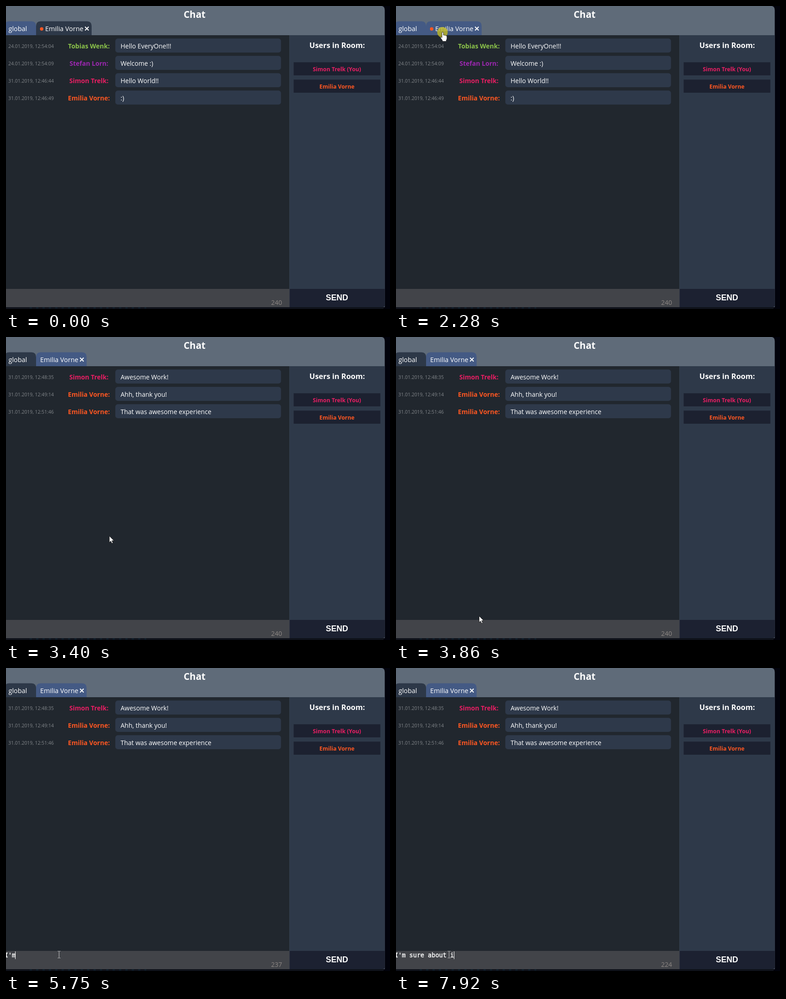
These frames come from a looping animation (843 px wide and 664 px high, 8000 ms). An HTML page:

```html
<!DOCTYPE html>
<html lang="en">
<head>
<meta charset="utf-8">
<title>Chat</title>
<style>
  html, body { margin: 0; width: 100%; height: 100%; overflow: hidden; background: #02030c; }
  svg { display: block; }
  text { font: 14px "Open Sans", "Noto Sans", sans-serif; fill: #fff; white-space: pre; }
  .mid { text-anchor: middle; }
  .bold { font-weight: 700; }
  .title { font-size: 20.6px; }
  .heading { font-size: 16.4px; }
  .user { font-size: 12.25px; }
  .time { font-size: 10.45px; fill: #83878b; }
  .tab { font-size: 14.4px; }
  .count { fill: #8d8784; text-anchor: end; }
  .send { font: 700 17.7px "Liberation Sans", Arial, sans-serif; }
  .draft { font: 13.55px "DejaVu Sans Mono", monospace; stroke: #fff; stroke-width: .4px; }
</style>
</head>
<body>
<svg width="843" height="664" viewBox="0 0 843 664">
  <path d="M0 660H829V664H0Z" fill="#0f121a"/>
  <path d="M52 661.5H308" stroke="#0f1d29" stroke-width="3" stroke-dasharray="5 9"/>
  <path d="M0 0H825Q831.5 1 831.5 9V660H0Z" fill="#5f6b79"/>
  <rect y="64" width="622.4" height="556" fill="#21272e"/>
  <rect x="622.4" y="64" width="209.1" height="556" fill="#2e3949"/>
  <rect y="620" width="622.4" height="40" fill="#424449"/>
  <path d="M622.4 620H831.5V655Q831.5 660 827 660H622.4Z" fill="#1c2131"/>
  <text class="title bold mid" x="414" y="26">Chat</text>
  <text class="heading bold mid" x="727" y="92">Users in Room:</text>
  <text class="send mid" x="726.5" y="645">SEND</text>
  <g id="users"></g>

  <path id="globalTab" d="M-3 64V44Q-3 33.5 7 33.5H56Q66 33.5 66 44V64Z"/>
  <text class="tab" x="5.5" y="55">global</text>
  <path id="privateTab"/>
  <circle id="unread" cx="78.3" cy="50.3" r="3.7" fill="#ff5722"/>
  <g id="privateLabel">
    <text class="tab" x="75" y="55">Emilia Vorne</text>
    <path d="M162.5 45.5l8 8m0-8l-8 8" stroke="#fff" stroke-width="2"/>
  </g>

  <g id="globalRoom"></g>
  <g id="privateRoom"></g>

  <text id="draft" class="draft" x="-3.3" y="634"></text>
  <rect id="caret" y="621" width="1" height="17" fill="#fff"/>
  <text id="count" class="count" x="606" y="655"></text>

  <circle id="click" r="11.5" fill="#c8c01e" opacity=".75"/>
  <g id="cursor" stroke-linejoin="round">
    <path id="arrow" d="M.5 .5V14.5L3.7 11.5L6 16.5L8.3 15.5L6.1 10.6H10.5Z" fill="#fff" stroke="#111" stroke-width=".8"/>
    <path id="hand" d="M-1.6 1.8Q-1.6 .4 0 .4T1.6 1.8V7Q3 5.8 4.4 7.4Q6 6.4 7 8Q9.4 7.4 9.4 10V14Q9.4 16.5 7.8 18V20.5H-.6V18.5L-4.2 13.6Q-5.4 11.6-4 11Q-3 10.6-1.6 12.4Z" fill="#fff" stroke="#111" stroke-width=".8"/>
    <path id="beam" d="M-3-7.5H-1Q0-7.5 0-6.5Q0-7.5 1-7.5H3M0-6.5V6.5M-3 7.5H-1Q0 7.5 0 6.5Q0 7.5 1 7.5H3" fill="none" stroke="#c4c4c6"/>
  </g>
</svg>
<script>
const $ = id => document.getElementById(id);
const show = (id, on) => $(id).setAttribute('display', on ? 'inline' : 'none');
const set = (id, name, value) => $(id).setAttribute(name, value);
const within = (t, from, to) => t >= from && t < to;

const colors = { 'Tobias Wenk': '#8bc34a', 'Stefan Lorn': '#9c27b0', 'Simon Trelk': '#e91e63', 'Emilia Vorne': '#ff5722' };

const messages = rows => rows.map(([time, name, text], i) => {
  const y = 71 + 38 * i;
  return `<rect x="240" y="${y + .3}" width="363.7" height="30.6" rx="5.5" fill="#2e394a"/>
    <text class="time" x="5" y="${y + 21}">${time}</text>
    <text class="bold mid" x="182" y="${y + 22}" style="fill:${colors[name]}">${name}:</text>
    <text x="251.5" y="${y + 22}">${text}</text>`;
}).join('');

$('globalRoom').innerHTML = messages([
  ['24.01.2019, 12:54:04', 'Tobias Wenk', 'Hello EveryOne!!!'],
  ['24.01.2019, 12:54:09', 'Stefan Lorn', 'Welcome :)'],
  ['31.01.2019, 12:46:44', 'Simon Trelk', 'Hello World!!'],
  ['31.01.2019, 12:46:49', 'Emilia Vorne', ':)']
]);
$('privateRoom').innerHTML = messages([
  ['31.01.2019, 12:48:35', 'Simon Trelk', 'Awesome Work!'],
  ['31.01.2019, 12:49:14', 'Emilia Vorne', 'Ahh, thank you!'],
  ['31.01.2019, 12:51:46', 'Emilia Vorne', 'That was awesome experience']
]);
$('users').innerHTML = [['Simon Trelk', ' (You)'], ['Emilia Vorne', '']].map(([name, note], i) =>
  `<rect x="631.5" y="${123.3 + 38 * i}" width="190.3" height="28.7" fill="#1c2130"/>
   <text class="user bold mid" x="726.5" y="${143 + 38 * i}" style="fill:${colors[name]}">${name}${note}</text>`
).join('');

// time, x, y, pointer shape until the next key
const path = [
  [0, 0, 0, ''], [740, 696, 412, 'arrow'], [789, 696, 412, 'arrow'], [790, 0, 0, ''],
  [1020, 13, 78, 'arrow'], [1070, 26, 70, 'arrow'], [1120, 39, 61.5, 'hand'], [1170, 39, 61.5, 'hand'],
  [1220, 58, 63, 'arrow'], [1300, 77, 68, 'arrow'], [1480, 77, 68, 'arrow'],
  [1530, 84, 63, 'hand'], [1680, 102.5, 57, 'hand'], [2840, 102.5, 57, 'hand'],
  [2880, 110, 80, 'arrow'], [2970, 132, 148, 'arrow'], [3020, 132, 148, 'arrow'],
  [3150, 190, 250, 'arrow'], [3320, 233, 380, 'arrow'], [3480, 220, 490, 'arrow'],
  [3630, 191, 569, 'arrow'], [3680, 191, 572, 'arrow'], [3860, 182, 611, 'arrow'], [3910, 182, 611, 'arrow'],
  [3960, 179, 621, 'beam'], [4140, 174.5, 628, 'beam'], [4640, 174.5, 628, 'beam'],
  [4680, 116.5, 628, 'beam'], [8000, 116.5, 628, 'beam']
];
const draft = "I'm sure about i";
const keyTimes = [5340, 5570, 5750, 6390, 6590, 6820, 6890, 6950, 7100, 7280, 7460, 7510, 7690, 7740, 7890, 7920];
const charWidth = 8.157;

function drawCursor(t) {
  const i = path.findIndex(key => key[0] > t);
  const [t0, x0, y0, shape] = path[i - 1], [t1, x1, y1] = path[i];
  const k = (t - t0) / (t1 - t0);
  set('cursor', 'transform', `translate(${x0 + (x1 - x0) * k} ${y0 + (y1 - y0) * k})`);
  for (const id of ['arrow', 'hand', 'beam']) show(id, id === shape);
}

function draw(t) {
  const isPrivate = t >= 2380;
  const right = isPrivate ? 177 : 188;
  set('privateTab', 'd', `M66 64V44Q66 33.5 76 33.5H${right - 10}Q${right} 33.5 ${right} 44V64Z`);
  set('privateTab', 'fill', t >= 1530 ? '#445a84' : '#2d3848');
  set('globalTab', 'fill', isPrivate ? '#2d3848' : '#445a84');
  set('privateLabel', 'transform', `translate(${right - 177})`);
  show('unread', !isPrivate);
  show('globalRoom', !isPrivate);
  show('privateRoom', isPrivate);

  const typed = keyTimes.filter(time => time <= t).length;
  $('draft').textContent = draft.slice(0, typed);
  $('count').textContent = 240 - typed;
  set('caret', 'x', Math.round(-4 + charWidth * typed));
  show('caret', typed && !within(t, 6310, 6390));

  const tabClick = within(t, 2280, 2380);
  show('click', tabClick || within(t, 4370, 4420));
  set('click', 'cx', tabClick ? 102 : 172.5);
  set('click', 'cy', tabClick ? 57.5 : 628);
  drawCursor(t);
}

function tick() {
  draw(performance.now() % 8000);
  requestAnimationFrame(tick);
}
tick();
</script>
</body>
</html>
```
